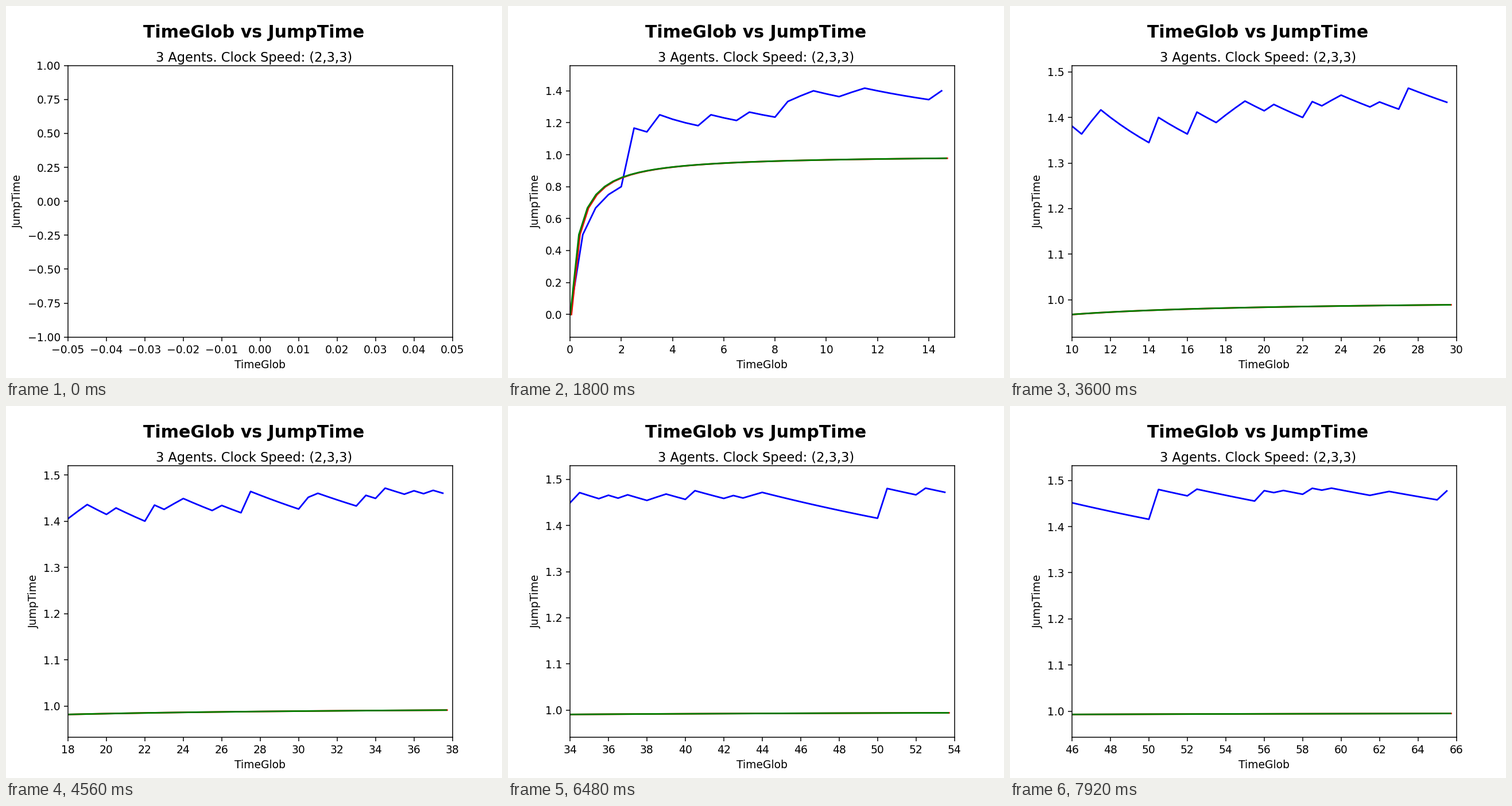
Animation of 864x648 px, one loop 8 s. Source, as a matplotlib script:

```python
import numpy as np
import matplotlib.pyplot as plt
from matplotlib.animation import FuncAnimation
from matplotlib.ticker import MaxNLocator

INTERVAL = 40   # ms per drawn frame
HOLD = 3        # drawn frames per clock step
FRAMES = 200
SPAN = 20       # width of the scrolling window

# Jump lengths of the slow agent: 1 unless listed here
JUMPS = {
    2: (7, 11, 14, 18, 19, 22, 23, 36, 37, 38, 41, 47, 48, 52, 62, 72, 74,
        77, 78, 85, 87, 88, 114, 119, 124, 125),
    3: (5, 17, 29, 33, 45, 61, 67, 69, 81, 105, 117),
    4: (55, 112, 131),
    8: (101,),
}


def agent(speed, offset, count, jumps=None):
    """Times of the ticks and the running mean of the jump lengths."""
    n = np.arange(count)
    size = np.ones(count)
    size[0] = 0
    for length, ticks in (jumps or {}).items():
        size[list(ticks)] = length
    return offset + n / speed, np.cumsum(size) / (n + 1)


agents = [
    agent(2, 0.0, 132, JUMPS),
    agent(3, 0.055, 198),
    agent(3, 0.0135, 198),
]

plt.rcParams["font.family"] = "DejaVu Sans"
fig, ax = plt.subplots(figsize=(6.4, 4.8), dpi=135, facecolor="white")
fig.subplots_adjust(left=0.125, right=0.9, bottom=0.11, top=0.84)
fig.suptitle("TimeGlob vs JumpTime", y=0.95, fontsize=16, fontweight="bold")
fig.text(0.5, 0.85, "3 Agents. Clock Speed: (2,3,3)", fontsize=12, ha="center")
ax.set_xlabel("TimeGlob")
ax.set_ylabel("JumpTime")
ax.xaxis.set_major_locator(MaxNLocator(integer=True))
lines = [ax.plot([], [], color=c, lw=1.5)[0] for c in ("blue", "red", "green")]


def update(frame):
    now = frame // HOLD
    start = max(0, now - SPAN)
    seen = []
    for line, (t, y) in zip(lines, agents):
        inside = (t >= start) & (t < now)
        line.set_data(t[inside], y[inside])
        seen.append(y[inside])
    if now == 0:
        ax.set_xlim(-0.05, 0.05)
        ax.set_ylim(-1, 1)
    else:
        values = np.concatenate(seen)
        low, high = values.min(), values.max()
        margin = 0.1 * (high - low)
        ax.set_xlim(start, now)
        ax.set_ylim(low - margin, high + margin)
    return lines


anim = FuncAnimation(fig, update, frames=FRAMES, interval=INTERVAL,
                     init_func=lambda: update(0), repeat=True,
                     repeat_delay=0, cache_frame_data=False)
plt.show()
```
